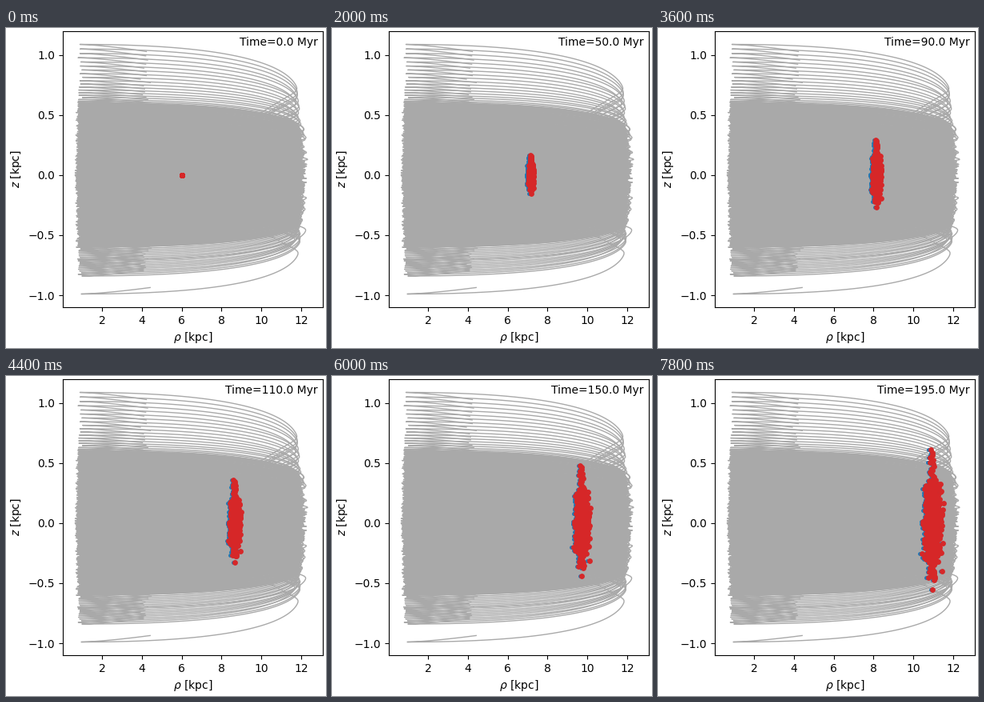
Animation of 400x400 px, one loop 8 s. Source, as a matplotlib script:

```python
import numpy as np
import matplotlib.pyplot as plt
from matplotlib.animation import FuncAnimation
from matplotlib.collections import LineCollection

FRAMES, INTERVAL, STEP = 40, 200, 5.0   # frames, ms, Myr per frame
OMEGA = 0.003046                        # vertical frequency, rad / Myr
APO_PHASE, PERI_PHASE = 0.66, np.pi / 2

rng = np.random.default_rng(7)


def scatter(sigma, limit, size):
    return np.clip(rng.normal(0, sigma, size), -limit, limit)


# Vertical amplitudes: an even core, thinning out above and below
x = np.linspace(-1, 1, 520)
core = 0.6 * (0.7 * x + 0.3 * x**3)
above = 0.6 + 0.49 * np.linspace(0, 1, 20)**1.5
below = -np.linspace(0.6, 0.84, 18)
amp = np.concatenate([core, above, below])
dv = scatter(0.22, 0.52, amp.size) * np.sqrt(1 - (amp / 1.15)**2)

# Stray stars: amplitude and radial offset
strays = np.array([(-0.99, -0.03), (-0.71, 0.45), (-0.45, -0.58)])
amp = np.append(amp, strays[:, 0])[:, None]
dv = np.append(dv, strays[:, 1])[:, None]

apo = 12.03 + 0.62 * dv - 0.12 * amp**2 + scatter(0.03, 0.1, amp.shape)
peri = 0.8 + 0.1 * np.abs(amp) + scatter(0.07, 0.15, amp.shape)
last = 4.2 + scatter(0.13, 0.3, amp.shape)


def radius(phi):
    """Outward leg blended smoothly into the inward leg."""
    outward = 6 + 7.5 * phi + 1.55 * phi**2 + dv * phi / 0.594
    u = np.clip((phi - APO_PHASE) / (PERI_PHASE - APO_PHASE), 0, 1)
    inward = apo - (apo - peri) * u**2
    k = 0.14
    return -k * np.logaddexp(-outward / k, -inward / k)


def orbits():
    phi = np.linspace(0, PERI_PHASE, 90)
    tail = np.linspace(0, 1, 12)[1:]
    rho = np.hstack([radius(phi), peri + (last - peri) * tail**1.4])
    z = amp * np.sin(np.append(phi, PERI_PHASE + 0.333 * tail))
    return np.stack([rho, z], axis=-1)


fig = plt.figure(figsize=(4, 4), dpi=100)
ax = fig.add_axes([71 / 400, 51 / 400, 325 / 400, 345 / 400])
ax.set_xlim(0.032, 13.084)
ax.set_ylim(-1.1, 1.2)
ax.set_xticks(range(2, 13, 2))
ax.set_yticks(np.linspace(-1, 1, 5))
ax.set_xlabel(r"$\rho$ [kpc]")
ax.set_ylabel(r"$z$ [kpc]")

ax.add_collection(LineCollection(orbits(), colors="darkgray", linewidths=1.0))
blue, = ax.plot([], [], "o", color="tab:blue", ms=2.5, zorder=3)
red, = ax.plot([], [], "o", color="tab:red", ms=3.9, zorder=4)
label = ax.text(0.98, 0.98, "", transform=ax.transAxes, ha="right", va="top")


def update(i):
    t = i * STEP
    phi = OMEGA * t
    rho = radius(phi)[:, 0]
    z = amp[:, 0] * np.sin(phi)
    red.set_data(rho, z)
    blue.set_data(rho - 0.1 * min(1, t / 25), z)
    label.set_text(f"Time={t:.1f} Myr")
    return blue, red, label


anim = FuncAnimation(fig, update, frames=FRAMES, interval=INTERVAL,
                     repeat=True, repeat_delay=0)
plt.show()
```
